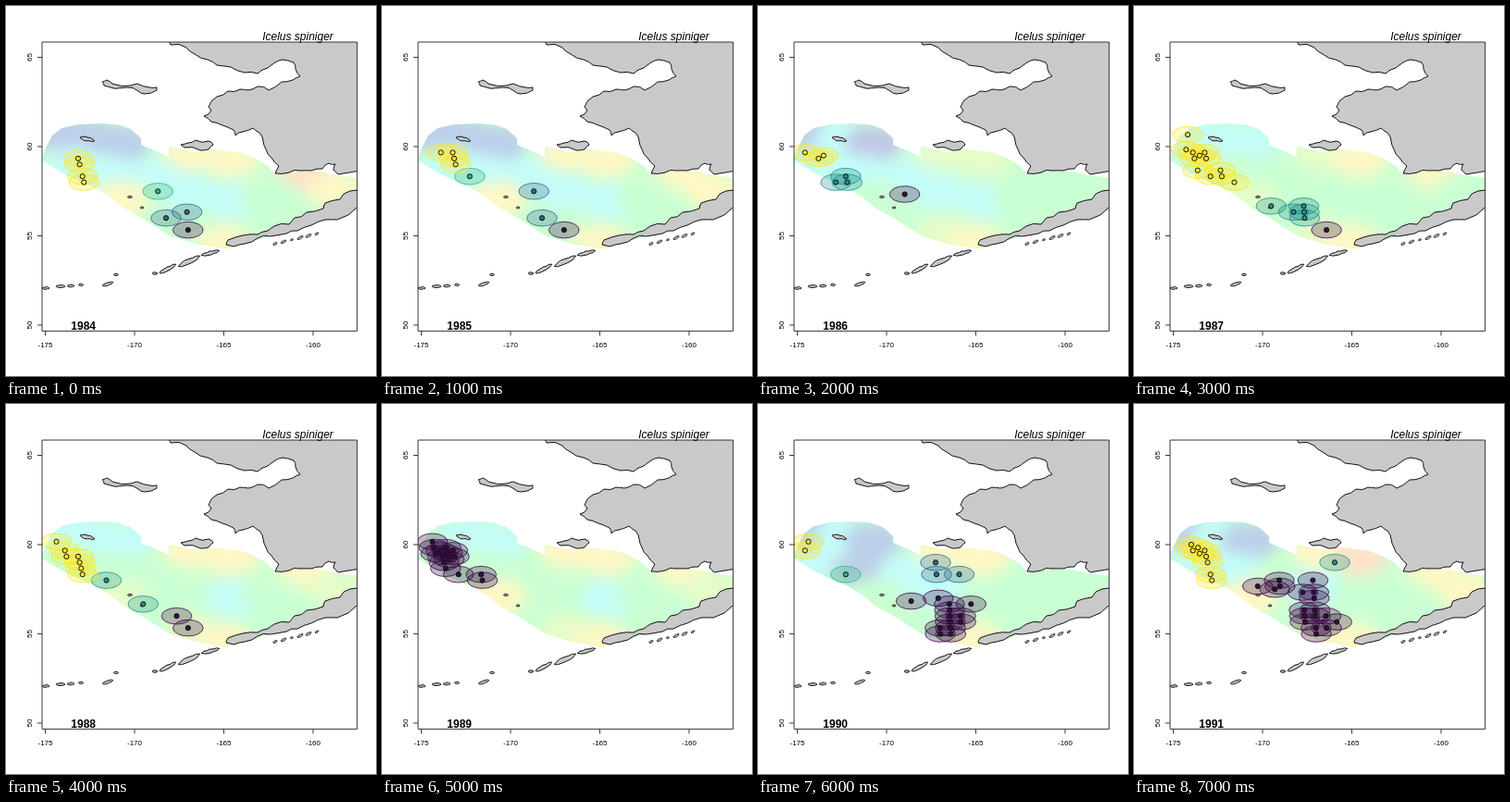
An HTML page for the animation above (8 s loop, 400 px wide and 400 px high).

```html
<!DOCTYPE html>
<html lang="en">
<head>
<meta charset="utf-8">
<title>Icelus spiniger</title>
<style>
  html, body { margin: 0; width: 100%; height: 100%; overflow: hidden; background: #fff; }
  svg { display: block; width: 100vw; height: 100vh; }
  text { font-family: "Liberation Sans", Arial, sans-serif; font-size: 8px; text-anchor: middle; }
  .land { fill: #c9c9c9; stroke: #111; stroke-linejoin: round; }
  .axis { fill: none; stroke: #222; stroke-width: .9; }
  .range { fill-opacity: .28; stroke-opacity: .8; }
  .dot { stroke: #111; }
  .title { font-size: 12px; font-style: italic; }
  .year { font-size: 12px; font-weight: bold; }
</style>
</head>
<body>
<svg id="map" viewBox="0 0 400 400"></svg>
<script>
const HOLD = 1000, DEGREE = 19.3, FIRST_YEAR = 1984;
const FRAME = 'M39 39H379.6V351.4H39z';
const FIELD = { B: '#bccfe9', V: '#c1c9e5', C: '#c4fcf8', G: '#caffd3', L: '#e5fdc9', Y: '#fdf8c5', O: '#fde3c6' };
const VIRIDIS = ['#3c0849', '#31688e', '#21908c', '#35b779', '#fde725'];

const lonX = lon => 42.5 + (lon + 175) * DEGREE;
const latY = lat => 345 - (lat - 50) * DEGREE;

let seed = 7;
const random = () => (seed = seed * 16807 % 2147483647) / 2147483647;

// Closed outline with a small random bend in the middle of every side.
function coast(points) {
  const path = points.flatMap(([x, y], i) => {
    const [nx, ny] = points[(i + 1) % points.length];
    const bend = (random() - .5) * .3;
    return [[x, y], [(x + nx) / 2 + (ny - y) * bend, (y + ny) / 2 - (nx - x) * bend]];
  });
  return 'M' + path.map(p => p.map(v => v.toFixed(1))).join('L') + 'z';
}
const trace = text => coast(text.split(',').map(pair => pair.trim().split(' ').map(Number)));

// Slim leaf-shaped island centred on x, y.
function islet(x, y, length, tilt = 0) {
  const points = [];
  for (let i = 0; i < 8; i++) {
    const a = i * Math.PI / 4;
    const u = Math.cos(a) * length / 2, v = Math.sin(a) * (.7 + length * .07);
    points.push([x + u * Math.cos(tilt) - v * Math.sin(tilt), y + u * Math.sin(tilt) + v * Math.cos(tilt)]);
  }
  return coast(points);
}

const land = [
  trace(`176 30, 178 42, 195 45, 204 52, 218 58, 228 64, 243 66, 258 72, 272 73, 283 67, 291 61, 299 58, 311 61,
    313 68, 318 76, 310 80, 298 82, 284 91, 272 87, 262 91, 253 90, 240 92, 228 98, 219 109, 222 113, 214 119,
    222 125, 234 129, 246 134, 248 140, 256 136, 267 132, 274 137, 278 146, 281 155, 287 164, 295 173, 291 181,
    306 180, 318 178, 330 178, 342 176, 349 170, 356 171, 354 177, 359 182, 390 177, 390 30`),
  trace(`390 193, 372 200, 361 209, 345 213, 343 219, 325 223, 312 229, 306 236, 290 238, 283 243, 272 247,
    256 248, 240 253, 238 258, 246 260, 258 257, 272 251, 285 249, 303 246, 315 243, 330 237, 345 231,
    358 231, 370 226, 390 212`),
  trace('104 82, 109 80, 115 84, 135 86, 142 84, 155 88, 163 88, 163 91, 150 95, 143 92, 130 88, 106 86'),
  trace('189 150, 197 148, 205 145, 219 146, 224 150, 219 155, 210 156, 193 153'),
  islet(88, 144, 16, .25), islet(134, 206.5, 5), islet(147, 218, 4),
  islet(43, 305, 8), islet(59, 303, 10), islet(70, 302.5, 8), islet(81, 301.5, 5),
  islet(110, 300.5, 12, -.3), islet(119, 290.5, 5), islet(161, 289, 6),
  islet(175, 284, 20, -.5), islet(198, 276, 26, -.45), islet(221, 267, 20, -.25)
];
for (let x = 291; x < 345; x += 9) land.push(islet(x, 257 - (x - 291) * .24, 3 + 4 * random(), -.5));

const survey = `M39 167L42 155 50 140 60 132 78 128 100 127 120 128 135 133 146 143 146 150 165 158 176 163
  176 152 205 158 225 155 240 157 255 159 268 164 282 172 292 183 310 178 340 179 357 183 390 187 390 205
  300 245 237 263 205 257 178 249 165 241 150 231 128 219 112 206 95 196 78 189 60 180z`;

// Places where the water temperature is known; each year gives one colour letter per place.
const anchors = [
  [57, 137], [92, 142], [125, 148], [75, 172], [110, 180], [160, 182], [125, 209], [200, 158],
  [243, 166], [195, 200], [245, 210], [200, 246], [236, 256], [322, 180], [285, 205], [357, 200]
];
const field = letters => anchors.map(([x, y], i) =>
  `<ellipse cx="${x}" cy="${y}" rx="31" ry="20" fill="${FIELD[letters[i]]}"/>`).join('');

// Survey stations lie 20 nautical miles apart: columns west of 163.7 W, rows north of 55 N.
function station(column, row) {
  const lat = 55 + row / 3;
  return [242 - column * DEGREE / 3 / Math.cos(lat * Math.PI / 180), latY(lat)];
}

// "column:row" or "column:first-last", separated by spaces.
function stations(text) {
  return text.split(' ').flatMap(run => {
    const [column, rows] = run.split(':');
    const [first, last = first] = rows.split('-').map(Number);
    return Array.from({ length: last - first + 1 }, (_, i) => station(+column, first + i));
  });
}

// Groups share the palette evenly, from purple to yellow.
function groupMarks(groups) {
  let ranges = '', dots = '';
  groups.forEach((group, i) => {
    const color = VIRIDIS[Math.round(4 * i / Math.max(1, groups.length - 1))];
    for (const [x, y] of stations(group)) {
      const at = `cx="${x.toFixed(1)}" cy="${y.toFixed(1)}" fill="${color}"`;
      ranges += `<ellipse class="range" ${at} rx="16.3" ry="8.8" stroke="${color}"/>`;
      dots += `<circle class="dot" ${at} r="2.6"/>`;
    }
  });
  return ranges + dots;
}

const years = [
  ['BBBCCCYYYCCGYOGY', '4:1', '6:3 4:4', '6.5:7.5', '13:9-10 13:12-13'],
  ['BBBCCCYYYCCGYYGY', '4:1', '6:3 6.5:7.5', '12:10', '13:12-14 14:14'],
  ['BCVCCCGLLCCLYGGG', '7:7', '12:9-10 13:9', '13.5:13.5 14:13 15:14'],
  ['CCCCGGLLYGGLYYGG', '3:1', '8:5 6:4 5:3-5',
    '14:17 14.5:14.5 14:13-14 13.5:13.5 13:13-14 14:11 13:10 12:10-11 11:9'],
  ['CCCGGGLYYGCLYYGL', '4:1 5:3', '8:5 11:9', '13:10-13 14:13-14 14.5:15.5'],
  ['GCCGGGYYYGCLYYGL', '14.5:13.5-15.5 14:11-14 13.5:12.5-14.5 13:13-14 13:10 11:9-10'],
  ['BCBCBCGYYCGGYGGG', '6.5:5.5 5:6 4:6 3:2-5 1:5 2:2-3 4:0-1 3:0-1'.replace('5:6 ', ''),
    '4:12 4:10 2:10', '12:10', '14.5:15.5 15:14'],
  ['BCBCCGYYOCGLYYGY', '9:8 7:8-9 7.5:7.5 4:9 5:7 4:6-7 5:2-4 4:3-4 3:3 4:0-1 3:1 2:2',
    '2:12', '14:14-15 13.5:13.5-14.5 13:12-14 13:9-10']
].map(([letters, ...groups]) => ({ field: field(letters), marks: groupMarks(groups) }));

function axes() {
  let ticks = FRAME, labels = '';
  for (let i = 0; i < 4; i++) {
    const lon = -175 + 5 * i, lat = 50 + 5 * i, x = lonX(lon), y = latY(lat);
    ticks += `M${x} 351.4v5M39 ${y}h-5`;
    labels += `<text x="${x}" y="369">${lon}</text>
      <text transform="translate(28 ${y}) rotate(-90)">${lat}</text>`;
  }
  return `<path class="axis" d="${ticks}"/>${labels}`;
}

const map = document.getElementById('map');
const layer = key => years.map(y => `<g class="${key}" display="none">${y[key]}</g>`).join('');
map.innerHTML = `
  <clipPath id="frame"><path d="${FRAME}"/></clipPath>
  <clipPath id="survey"><path d="${survey}"/></clipPath>
  <filter id="soft" filterUnits="userSpaceOnUse" x="0" y="80" width="420" height="220"
    color-interpolation-filters="sRGB"><feGaussianBlur stdDeviation="8"/></filter>
  <g clip-path="url(#frame)">
    <g clip-path="url(#survey)"><g filter="url(#soft)">
      <path d="M0 80H420V300H0z" fill="${FIELD.G}"/>${layer('field')}
    </g></g>
    <path class="land" d="${land.join('')}"/>${layer('marks')}
  </g>
  ${axes()}
  <text class="title" x="315.5" y="37">Icelus spiniger</text>
  <text class="year" x="83.7" y="350"></text>`;

const layers = ['.field', '.marks'].map(name => map.querySelectorAll(name));
const label = map.querySelector('.year');

function draw() {
  const index = Math.floor(performance.now() / HOLD) % years.length;
  for (const groups of layers)
    groups.forEach((g, i) => g.setAttribute('display', i === index ? 'inline' : 'none'));
  label.textContent = FIRST_YEAR + index;
  requestAnimationFrame(draw);
}
draw();
</script>
</body>
</html>
```
